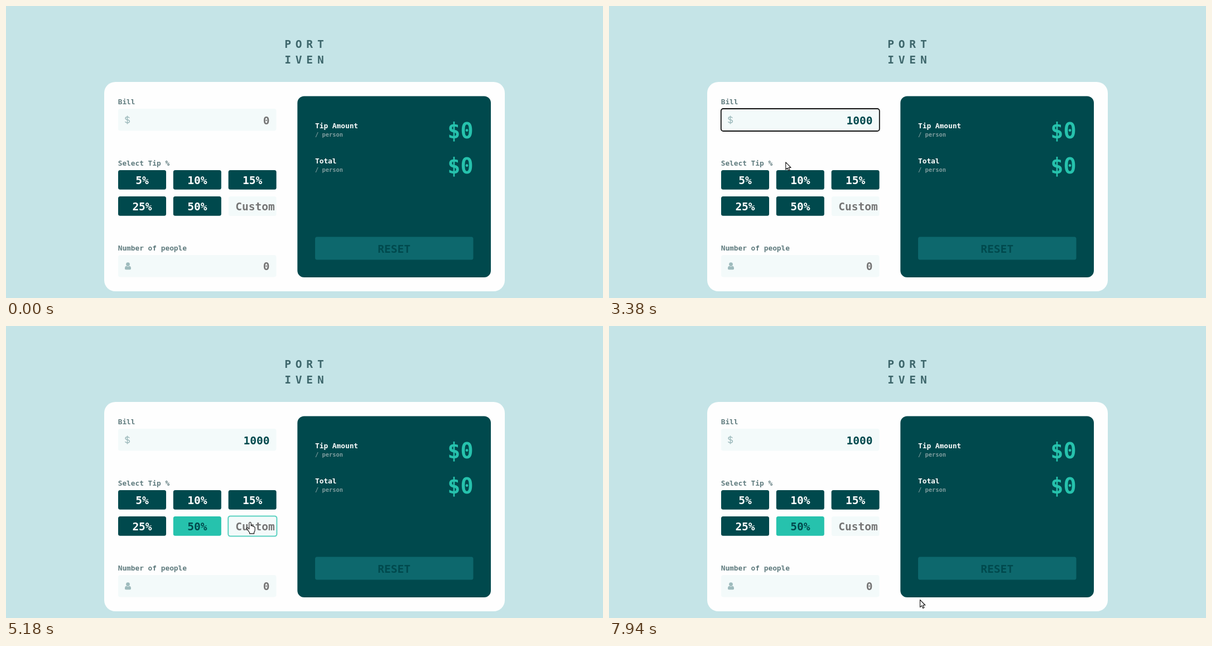
Animation, 1070 px wide and 523 px high, one loop 8 s. Source, as an HTML page:

```html
<!DOCTYPE html>
<html lang="en">
<head>
<meta charset="utf-8">
<title>Tip calculator</title>
<style>
  html, body { margin: 0; width: 100%; height: 100%; overflow: hidden; background: #c5e4e7; }
  svg { display: block; width: 100vw; height: 100vh; }
  text { font: bold 19.5px "DejaVu Sans Mono", "Liberation Mono", monospace; white-space: pre; }
  .logo { fill: #3d666b; letter-spacing: 7.85px; }
  .label { font-size: 12.8px; fill: #5e7a7d; }
  .title { font-size: 12.8px; fill: #fff; }
  .unit { font-size: 10.4px; fill: #7f9d9f; }
  .sum { font-size: 38.4px; fill: #26c2ad; text-anchor: end; }
  .mid { text-anchor: middle; }
  .end { text-anchor: end; }
  .hint { fill: #757575; }
  .field { fill: #f3fafa; }
  .ring { fill: none; stroke: #26c2ad; stroke-width: 2; }
  .icon { fill: #9ebbbd; }
  .pointer path { fill: #fff; stroke: #111; stroke-width: 1.1; stroke-linejoin: round; }
</style>
</head>
<body>
<svg viewBox="0 0 1070 523">
  <rect width="1070" height="523" fill="#c5e4e7"/>
  <text class="logo" x="499.2" y="75">PORT</text>
  <text class="logo" x="499.2" y="103">IVEN</text>
  <rect x="176" y="136" width="718" height="375" rx="20" fill="#fefefe"/>

  <text class="label" x="200.7" y="176">Bill</text>
  <rect class="field" x="201" y="184" width="283.5" height="39.5" rx="4"/>
  <path d="M221.3 200.6C220.4 199.2 219 198.8 217.5 198.8C215.4 198.8 214 199.8 214 201.3C214 205 221.4 202.6 221.4 206.6C221.4 208.2 219.8 209.2 217.6 209.2C215.6 209.2 214.2 208.5 213.4 207M217.5 196.6V211.4"
        fill="none" stroke="#9ebbbd" stroke-width="1.5"/>
  <text id="bill" class="end" x="472.5" y="211.5">0</text>
  <rect id="focus" x="200.8" y="184" width="284" height="40" rx="4" fill="none" stroke="#101010" stroke-width="1.8"/>
  <rect id="billRing" class="ring" x="200.2" y="183.6" width="285" height="40.8" rx="4.5"/>
  <rect id="caret" x="471" y="190" width="1" height="28" fill="#5f7577"/>

  <text class="label" x="200.7" y="285.5">Select Tip %</text>
  <g id="tips"></g>
  <rect class="field" x="399" y="341" width="85.5" height="35" rx="3.5"/>
  <text class="hint" x="411.3" y="366">Custom</text>
  <rect id="customRing" class="ring" x="398.2" y="340.4" width="87.2" height="36.2" rx="4"/>

  <text class="label" x="200.7" y="437.5">Number of people</text>
  <rect class="field" x="201" y="446" width="283.5" height="39.5" rx="4"/>
  <circle class="icon" cx="218.5" cy="462.6" r="3.4"/>
  <path class="icon" d="M213 469.5Q213 466 216 465.8Q218.5 467.6 221 465.8Q224 466 224 469.5V470.5Q224 472.2 222.3 472.2H214.7Q213 472.2 213 470.5Z"/>
  <text class="end hint" x="472.5" y="473">0</text>

  <rect x="522.3" y="161.5" width="346.7" height="324.5" rx="12" fill="#00494d"/>
  <text class="title" x="554" y="218.5">Tip Amount</text>
  <text class="unit" x="554" y="234.3">/ person</text>
  <text class="sum" x="837.5" y="236.7">$0</text>
  <text class="title" x="554" y="281.5">Total</text>
  <text class="unit" x="554" y="297.3">/ person</text>
  <text class="sum" x="837.5" y="299.7">$0</text>
  <rect x="554" y="413.5" width="283.5" height="41" rx="3.5" fill="#0d686d"/>
  <text class="mid" x="695.7" y="441.5" fill="#00494d">RESET</text>

  <g id="pointer" class="pointer">
    <circle id="glow" cx="-1" cy="1" r="9.7" fill="#fafa1e"/>
    <path id="hand" d="M-2 1.4Q-2 -.4 -.3 -.4Q1.4 -.4 1.4 1.4V6Q3.6 5 4.2 6.8Q6 6 6.5 7.9Q8.4 7.5 8.4 9.4V13.4Q8.4 15.5 6.8 17.6V20H-1.2V18Q-3 16.2 -4.2 13.6L-6 11.2Q-6.6 9.6 -5 9.4Q-3.6 9.5 -2 11.8Z"/>
    <path id="arrow" d="M0 .5V13.6L3 10.8L5.2 15.6L7.4 14.6L5.2 10H9.3Z"/>
  </g>
</svg>
<script>
const LOOP = 8000, FADE = 30, LAG = 40;
const $ = id => document.getElementById(id);
const ease = {
  line: p => p,
  out: p => 1 - (1 - p) ** 2,
  both: p => p * p * (3 - 2 * p)
};

// time, x, y, easing from the previous stop
const path = [
  [190, 1045, 511],
  [970, 466, 218, 'out'],
  [1100, 465, 215, 'line'],
  [2880, 465, 215, 'line'],
  [3660, 255.5, 306, 'both'],
  [3730, 255.5, 306, 'line'],
  [3900, 255.5, 326, 'line'],
  [3940, 255.5, 331, 'line'],
  [4200, 292, 350, 'line'],
  [4430, 325.5, 357, 'out'],
  [4830, 325.5, 357, 'line'],
  [5250, 446.5, 351.5, 'both'],
  [7190, 446.5, 351.5, 'line'],
  [7940, 557.5, 490, 'both']
];
const clicks = [1110, 4630];
const keys = [1900, 2160, 2290, 2420];
const caretOff = [[1700, 1900], [2950, 3450], [4010, 4430]];
const focusOn = 1110, focusOff = 4630, picked = 4700;

const dark = [0, 73, 77], white = [255, 255, 255];
const light = [159, 232, 223], teal = [38, 194, 173];
const billBox = [201, 184, 283.5, 39.5], customBox = [399, 341, 85.5, 35];

const tips = ['5%', '10%', '15%', '25%', '50%'].map((name, i) => {
  const x = 201 + (i % 3) * 98.8, y = i < 3 ? 294 : 341;
  return { name, x, y, box: [x, y, 86, 34.7] };
});
$('tips').innerHTML = tips.map(b =>
  `<rect x="${b.x}" y="${b.y}" width="86" height="34.7" rx="3.5"/>` +
  `<text class="mid" x="${b.x + 43}" y="${b.y + 25}">${b.name}</text>`).join('');
tips.forEach((b, i) => {
  b.rect = $('tips').children[2 * i];
  b.text = $('tips').children[2 * i + 1];
});

function place(t) {
  if (t <= path[0][0]) return path[0].slice(1, 3);
  const i = path.findIndex(s => s[0] > t);
  if (i < 0) return path[path.length - 1].slice(1, 3);
  const a = path[i - 1], b = path[i];
  const p = ease[b[3]]((t - a[0]) / (b[0] - a[0]));
  return [a[1] + (b[1] - a[1]) * p, a[2] + (b[2] - a[2]) * p];
}

function hit(box, t) {
  const [x, y] = place(t);
  return x >= box[0] && x <= box[0] + box[2] && y >= box[1] && y <= box[1] + box[3];
}

// Hover strength: short trailing average of the hit test
const hover = (box, t) =>
  [0, 1, 2, 3].reduce((sum, k) => sum + hit(box, t - LAG - k * FADE), 0) / 4;

const mix = (a, b, p) => `rgb(${a.map((v, i) => Math.round(v + (b[i] - v) * p))})`;

function glow(t) {
  const age = Math.min(...clicks.map(c => t >= c ? t - c : LOOP));
  return age < 150 ? 0.55 : Math.max(0, 0.55 * (1 - (age - 150) / 170));
}

function draw(t) {
  const typed = keys.filter(k => t >= k).length;
  $('bill').textContent = '1000'.slice(0, typed) || '0';
  $('bill').setAttribute('fill', typed ? '#00494d' : '#757575');

  const focused = t >= focusOn && t < focusOff;
  const over = hover(billBox, t);
  $('billRing').style.opacity = over;
  $('focus').style.opacity = focused ? 1 - over : 0;
  $('caret').style.opacity = focused && !caretOff.some(([a, b]) => t >= a && t < b) ? 1 : 0;
  $('customRing').style.opacity = hover(customBox, t);

  for (const b of tips) {
    const on = b.name === '50%' && t >= picked, h = hover(b.box, t);
    b.rect.setAttribute('fill', mix(on ? teal : dark, light, h));
    b.text.setAttribute('fill', mix(on ? dark : white, dark, h));
  }

  const [x, y] = place(t);
  const hand = [billBox, customBox, ...tips.map(b => b.box)].some(box => hit(box, t - LAG));
  $('pointer').setAttribute('transform', `translate(${x} ${y})`);
  $('pointer').style.opacity = t < path[0][0] ? 0 : 1;
  $('hand').style.opacity = hand ? 1 : 0;
  $('arrow').style.opacity = hand ? 0 : 1;
  $('glow').style.opacity = glow(t);
}

const start = performance.now();
function tick() {
  draw((performance.now() - start) % LOOP);
  requestAnimationFrame(tick);
}
tick();
</script>
</body>
</html>
```
